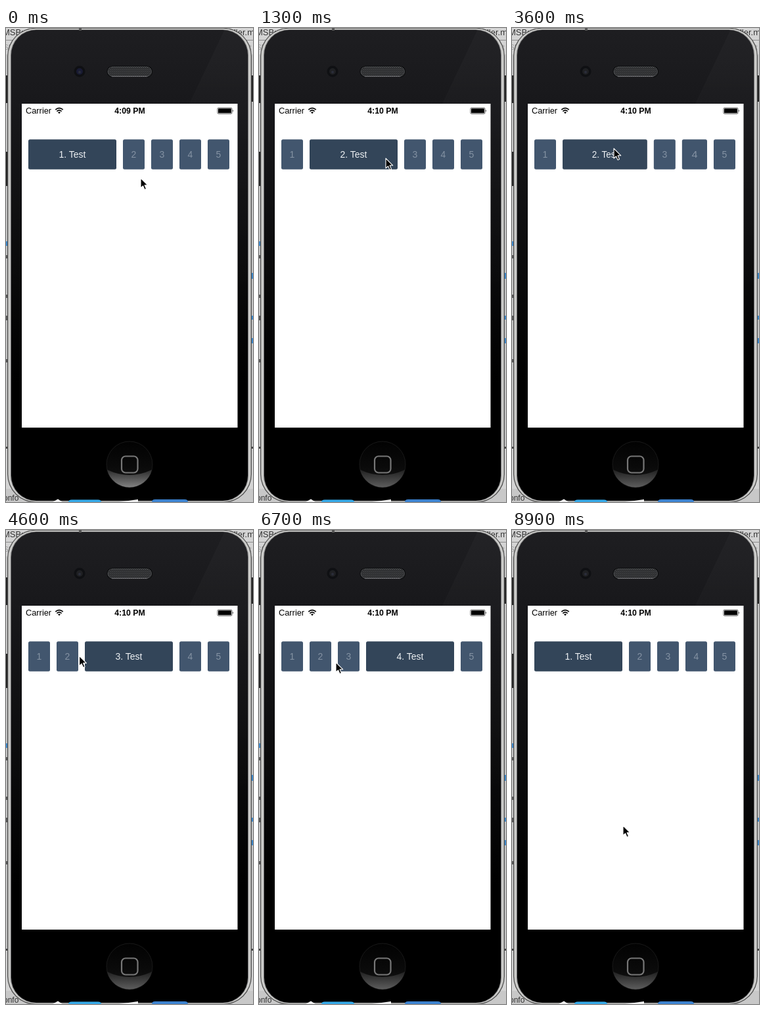
Recreate the animation shown at these times as an HTML page. Size 376 px wide and 720 px high, loop 9000 ms.

```html
<!DOCTYPE html>
<html lang="en">
<head>
<meta charset="utf-8">
<title>Expanding buttons</title>
<style>
html, body { margin: 0; width: 100%; height: 100%; overflow: hidden; background: #dcdcdc; }
svg { display: block; width: 376px; height: 720px; font-family: "Liberation Sans", Arial, sans-serif; }
</style>
</head>
<body>
<svg viewBox="0 0 376 720" xmlns="http://www.w3.org/2000/svg">
  <defs>
    <linearGradient id="body" x1="0" y1="0" x2="0" y2="1">
      <stop offset="0" stop-color="#1e1e21"/>
      <stop offset=".16" stop-color="#18181b"/>
      <stop offset=".5" stop-color="#0b0b0c"/>
      <stop offset=".75" stop-color="#000"/>
    </linearGradient>
    <linearGradient id="gloss" x1="0" y1="0" x2="0" y2="1">
      <stop offset="0" stop-color="#fff" stop-opacity=".025"/>
      <stop offset="1" stop-color="#fff" stop-opacity="0"/>
    </linearGradient>
    <linearGradient id="home" x1="0" y1="0" x2="0" y2="1">
      <stop offset="0" stop-color="#020202"/>
      <stop offset=".55" stop-color="#0a0a0a"/>
      <stop offset="1" stop-color="#181818"/>
    </linearGradient>
    <linearGradient id="shine" x1="0" y1="0" x2="0" y2="1">
      <stop offset="0" stop-color="#777" stop-opacity=".3"/>
      <stop offset="1" stop-color="#888" stop-opacity=".95"/>
    </linearGradient>
    <pattern id="mesh" width="3" height="3" patternUnits="userSpaceOnUse">
      <rect width="3" height="3" fill="#68696c"/>
      <circle cx=".8" cy=".8" r=".95" fill="#0c0d0e"/>
      <circle cx="2.3" cy="2.3" r=".95" fill="#0c0d0e"/>
    </pattern>
    <clipPath id="shell"><rect x="8" y="3" width="360" height="715" rx="38"/></clipPath>
  </defs>

  <!-- desktop behind the phone -->
  <rect width="376" height="720" fill="#d4d4d4"/>
  <rect y="18" width="376" height="1" fill="#8c8c8c"/>
  <rect y="40" width="376" height="596" fill="#c4c4c4"/>
  <path d="M0 72h3v42h-3zM0 188h3v52h-3zM373 72h3v40h-3z" fill="#222"/>
  <path d="M0 636h3v3h-3zM373 636h3v3h-3z" fill="#444"/>
  <path d="M0 700h60v20h-60zM316 700h60v20h-60z" fill="#c8c8c8"/>
  <path d="M0 324h2v7h-2zM373 372h3v9h-3zM374 437h2v6h-2zM373 471h3v8h-3z" fill="#3d87c9"/>
  <path d="M0 345h2v5h-2zM0 405h2v5h-2zM0 437h2v7h-2zM0 503h2v5h-2z" fill="#555"/>
  <g font-size="13" fill="#333">
    <text x="-5" y="11">MSButton</text>
    <text x="378" y="11" text-anchor="end">ller.m</text>
    <text x="-4" y="718" font-size="12">onfo</text>
    <text x="-3" y="33" font-size="10" fill="#999">SB</text>
    <text x="364" y="33" font-size="10" fill="#999">St</text>
  </g>

  <!-- phone -->
  <rect x="2" y="-.2" width="372" height="721" rx="43" fill="#484848"/>
  <rect x="3.2" y=".8" width="369.6" height="719" rx="42" fill="#cbcbc9"/>
  <rect x="7" y="2.4" width="362" height="716.2" rx="39" fill="#6c6c6e"/>
  <rect x="8" y="3" width="360" height="715" rx="38" fill="url(#body)"/>
  <path clip-path="url(#shell)" d="M334 0H376V420H352V115H279Z" fill="url(#gloss)"/>
  <rect x="111" y="0" width="4" height="4" fill="#555"/>

  <circle cx="112" cy="66" r="8.5" fill="#0f1013"/>
  <circle id="lens" cx="112" cy="66" r="5"/>
  <circle cx="112" cy="67" r="2" fill="#2b2d3a"/>
  <rect x="153.5" y="57.5" width="69.5" height="17.5" rx="8.7" fill="#08090a"/>
  <rect x="155" y="59" width="66.5" height="14.5" rx="7.2" fill="url(#mesh)" stroke="#4b4c4f"/>
  <path d="M161 73.7H215" stroke="#808184"/>

  <circle cx="188" cy="663" r="35" fill="url(#home)" stroke="#191919"/>
  <path id="crescent" d="M154 671Q188 687 222 671A35 35 0 0 1 154 671Z" fill="url(#shine)"/>
  <rect x="176" y="650.5" width="24.5" height="25" rx="6" fill="none" stroke="#777" stroke-width="2.2"/>

  <!-- dock tops -->
  <path d="M71 720L79 715.5L86 720ZM172 720L201 716V720Z" fill="#eee"/>
  <path d="M95 720Q95 716.5 100 716.5H140Q145 716.5 145 720Z" fill="#36a9e8"/>
  <path d="M222 720Q222 716 227 716H272Q277 716 277 720Z" fill="#3c82cf"/>

  <!-- screen -->
  <rect x="24" y="115" width="328.5" height="492" fill="#fff"/>
  <text x="30" y="130" font-size="12.8">Carrier</text>
  <path d="M75.3 124.2Q81 118.9 86.7 124.2M77.4 126.6Q81 123.3 84.6 126.6" fill="none" stroke="#000" stroke-width="1.7"/>
  <path d="M79 128.1Q81 126.4 83 128.1L81 130.3Z"/>
  <text id="clock" x="188.5" y="130" font-size="12.3" font-weight="bold" text-anchor="middle"></text>
  <rect x="321.9" y="121.2" width="22.2" height="9.2" rx="1.8" fill="#fff" stroke="#000" stroke-width=".6"/>
  <rect x="323" y="122.3" width="20" height="7" rx=".9"/>
  <path d="M345 124Q346.7 125.7 345 127.5Z"/>

  <g id="row"></g>
  <path id="cursor" d="M0 0V15L3.5 11.8L6 17.4L8.5 16.3L6.1 10.8H10.8Z" fill="#000" stroke="#fff" stroke-width="1.1" stroke-linejoin="round"/>
</svg>
<script>
const LOOP = 9000, STEP = 100, MORPH = 400;
const LEFT = 34, GAP = 10, NARROW = 33, WIDE = 134;
const NS = "http://www.w3.org/2000/svg";
const $ = id => document.getElementById(id);

// time of tap, button opened
const taps = [[-1000, 0], [820, 1], [2113, 3], [3264, 1], [4030, 2], [4980, 0], [6050, 3], [7030, 0]];

// pointer stops: time, x, y
const stops = [
  [0, 205, 228], [400, 205, 228], [800, 193, 198], [1400, 193, 198],
  [2050, 281, 192], [2450, 281, 192], [3220, 97, 190], [3600, 155, 183],
  [3900, 236, 190], [4100, 236, 190], [4900, 54, 192], [5100, 54, 192],
  [5500, 176, 186], [5950, 281, 192], [6200, 281, 192], [6700, 117, 201],
  [6900, 56, 204], [7500, 56, 204], [7950, 88, 280], [8300, 138, 405],
  [8600, 169, 449], [9000, 169, 449]
];

function set(el, attrs) {
  for (const k in attrs) el.setAttribute(k, attrs[k]);
}
function add(tag, parent, attrs) {
  const el = document.createElementNS(NS, tag);
  set(el, attrs);
  parent.appendChild(el);
  return el;
}
const mix = (a, b, p) => a + (b - a) * p;
const shade = (a, b, p) => `rgb(${a.map((v, i) => Math.round(mix(v, b[i], p)))})`;
const ease = u => u < .5 ? 2 * u * u : 1 - 2 * (1 - u) ** 2;

const buttons = [0, 1, 2, 3, 4].map(() => ({
  box: add("rect", $("row"), { y: 169.3, height: 45.4, rx: 2.5 }),
  label: add("text", $("row"), { "font-size": 14, "text-anchor": "middle" })
}));

// monotone cubic through the pointer stops
function slope(i, k) {
  return (stops[i + 1][k] - stops[i][k]) / (stops[i + 1][0] - stops[i][0]);
}
function tangent(i, k) {
  if (i === 0 || i === stops.length - 1) return 0;
  const a = slope(i - 1, k), b = slope(i, k);
  return a * b > 0 ? 2 * a * b / (a + b) : 0;
}
function pointer(t, k) {
  let i = 0;
  while (i < stops.length - 2 && t >= stops[i + 1][0]) i++;
  const [a, b] = [stops[i], stops[i + 1]];
  const d = b[0] - a[0], u = (t - a[0]) / d, v = 1 - u;
  return a[k] * v * v * (1 + 2 * u) + b[k] * u * u * (3 - 2 * u)
    + d * (tangent(i, k) * u * v * v - tangent(i + 1, k) * u * u * v);
}

function draw(t) {
  let n = taps.length - 1;
  while (n > 0 && taps[n][0] > t) n--;
  const open = taps[n][1], last = n ? taps[n - 1][1] : open;
  const p = ease(Math.min(1, (t - taps[n][0]) / MORPH));
  let x = LEFT;
  buttons.forEach(({ box, label }, i) => {
    const on = i === open;
    const grow = mix(i === last ? 1 : 0, on ? 1 : 0, p);
    const w = mix(NARROW, WIDE, grow);
    set(box, { x, width: w, fill: shade([66, 86, 110], [51, 69, 89], grow) });
    // the label bitmap scales with its button while it resizes
    const scale = w / (on ? WIDE : NARROW);
    set(label, {
      transform: `translate(${x + w / 2} 196.7) scale(${scale} 1)`,
      fill: on ? "#eef1f4" : "#8492a3"
    });
    label.textContent = on ? `${i + 1}. Test` : `${i + 1}`;
    x += w + GAP;
  });
  set($("cursor"), { transform: `translate(${pointer(t, 1)} ${pointer(t, 2)})` });
  $("clock").textContent = t < 600 ? "4:09 PM" : "4:10 PM";
  set($("lens"), { fill: t < 400 ? "#191b33" : "#1f2023" });
  set($("crescent"), { opacity: t < 400 ? 1 : .65 });
}

const start = performance.now();
function tick() {
  const t = (performance.now() - start) % LOOP;
  draw(Math.floor(t / STEP) * STEP);
  requestAnimationFrame(tick);
}
tick();
</script>
</body>
</html>
```
